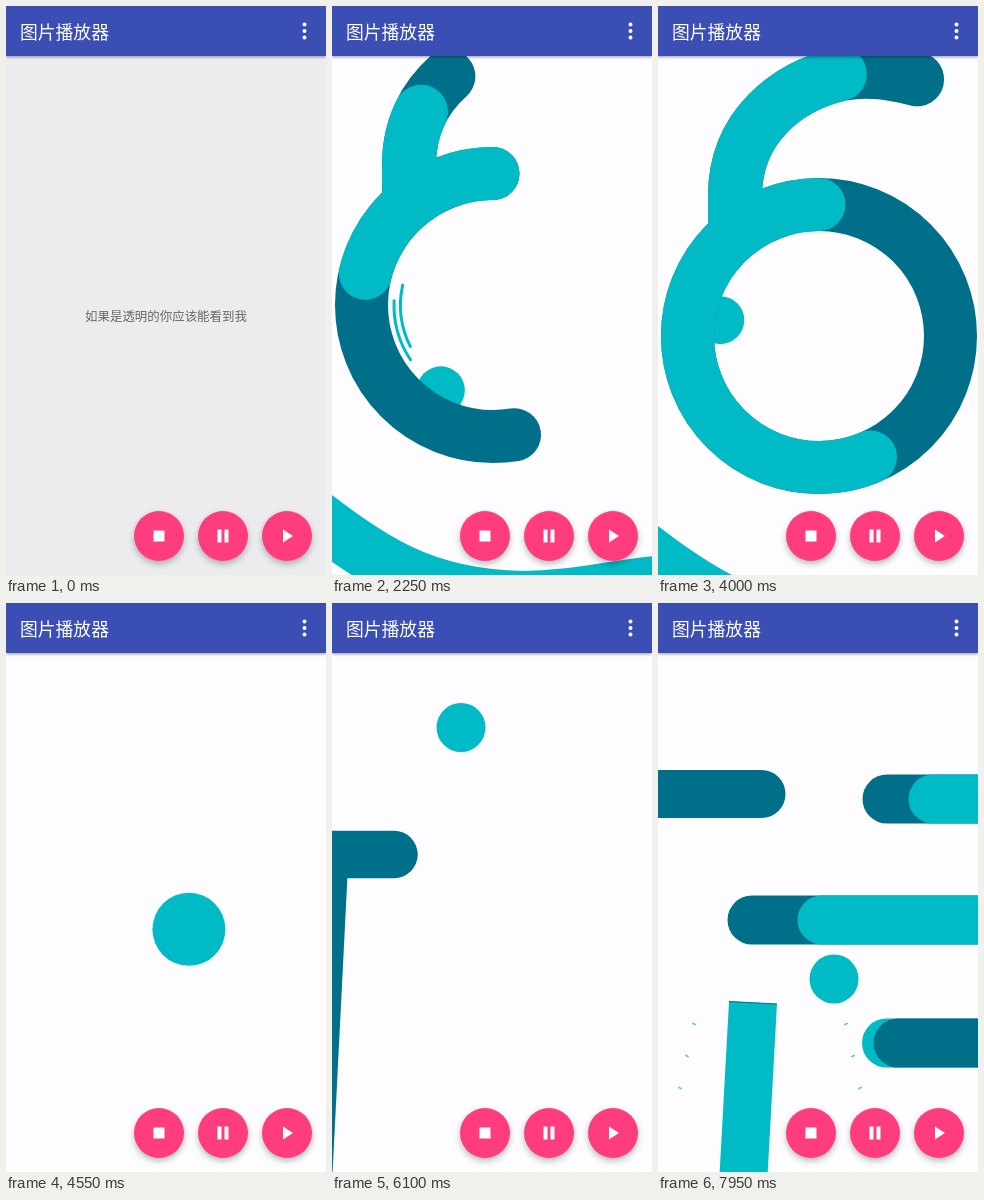
Write an HTML page with a canvas that moves like this. It is 320 by 569 pixels and loops after 8 s.

```html
<!DOCTYPE html>
<html lang="zh">
<head>
<meta charset="utf-8">
<style>
html, body { margin: 0; width: 100%; height: 100%; overflow: hidden; background: #ecebed; }
#stage { position: relative; width: 320px; height: 569px; overflow: hidden; font-family: "Noto Sans CJK SC", "Noto Sans CJK", sans-serif; }
#hint { position: absolute; top: 301px; width: 320px; text-align: center; font-size: 12.46px; line-height: 18px; color: #68676b; }
canvas, svg { position: absolute; left: 0; top: 0; width: 320px; height: 569px; }
#bar { position: absolute; width: 320px; height: 50px; background: #3b4eb4; box-shadow: 0 1px 3px #0006; }
#title { position: absolute; left: 14px; top: 12px; font-size: 17.8px; line-height: 26px; color: #fff; }
.fab { filter: drop-shadow(0 3px 3px #0004); fill: #ff3c7e; }
</style>
</head>
<body>
<div id="stage">
  <div id="hint">如果是透明的你应该能看到我</div>
  <canvas></canvas>
  <div id="bar"><div id="title">图片播放器</div></div>
  <svg viewBox="0 0 320 569" fill="#fff">
    <path d="M298.5 18.5v0m0 6.5v0m0 6.5v0" stroke="#fff" stroke-width="4" stroke-linecap="round"/>
    <g class="fab"><circle cx="153" cy="530" r="25"/><circle cx="217" cy="530" r="25"/><circle cx="281" cy="530" r="25"/></g>
    <path d="M147.5 524.5h11v11h-11zM211.5 523.5h4v13h-4zM218.5 523.5h4v13h-4zM277 523.5l10 6.5l-10 6.5z"/>
  </svg>
</div>
<script>
const TEAL = '#00bac5', DARK = '#006f8a', PAPER = '#fdfcff', LOOP = 8000;
const canvas = document.querySelector('canvas');
const g = canvas.getContext('2d');
const ratio = window.devicePixelRatio || 1;
canvas.width = 320 * ratio;
canvas.height = 569 * ratio;

const easeIn = u => u * u;
const easeOut = u => 1 - (1 - u) ** 2;
const mix = (a, b, u) => a + (b - a) * u;
const ramp = (t, from, to) => Math.min(1, Math.max(0, (t - from) / (to - from)));
const rad = degrees => degrees * Math.PI / 180;

// Height of a ball that keeps hopping between floor and top.
function bounce(t, start, period, floor, top) {
  const p = (t - start) / period;
  const phase = p - Math.floor(p);
  return mix(floor, top, 4 * phase * (1 - phase));
}

function pathLength(d) {
  const path = document.createElementNS('http://www.w3.org/2000/svg', 'path');
  path.setAttribute('d', d);
  return path.getTotalLength();
}

function disc(x, y, r) {
  g.fillStyle = TEAL;
  g.beginPath();
  g.arc(x, y, r, 0, 2 * Math.PI);
  g.fill();
}

function stroke(path, color, width, length = 1e4, cap = 'round') {
  if (length <= 0) return;
  g.strokeStyle = color;
  g.lineWidth = width;
  g.lineCap = cap;
  g.setLineDash([length, 1e4]);
  g.stroke(path);
}

function line(x1, y1, x2, y2, color, width, cap) {
  stroke(new Path2D(`M${x1} ${y1}L${x2} ${y2}`), color, width, 1e4, cap);
}

function arc(r, from, to, color, width) {
  const path = new Path2D();
  path.arc(0, 0, r, rad(from), rad(to), true);
  stroke(path, color, width);
}

function shifted(x, y, draw) {
  g.save();
  g.translate(x, y);
  draw();
  g.restore();
}

const HOOK_TOP = 'M268 0C262 80 256 130 243 197';
const HOOK = HOOK_TOP + 'C223 300 184 415 109 415Q93 415 81 410';
const hook = new Path2D(HOOK);
const topLength = pathLength(HOOK_TOP), hookLength = pathLength(HOOK);
const sprout = new Path2D('M-84 -115V-140C-84 -210 -31 -250 22 -262C54 -268 79 -261 101 -256');
const wave = new Path2D('M-201 193C-121 256 -71 291 29 293C89 293 129 278 199 275');
const arm = new Path2D('M-60 425C-5 450 50 468 99 478');

function hookScene(t) {
  const leave = easeIn(ramp(t, 1700, 1950));
  shifted(-350 * leave, 90 * leave, () => {
    stroke(hook, DARK, 51, hookLength * easeOut(ramp(t, 750, 1250)));
    stroke(hook, TEAL, 51, topLength * (t - 850) / 400);
    disc(144.5 + (t - 1250) * 0.03, bounce(t, 850, 800, 480, 329.5), 24);
  });
}

function ringScene(t) {
  const u = (t - 2250) / 1750;
  const x = mix(500, 161, easeOut(ramp(t, 1700, 1950)));
  const y = mix(299, 330, u) + 620 * easeIn(ramp(t, 4030, 4250));
  const ballAngle = mix(121.6, -170.7, u);
  shifted(x, y, () => {
    stroke(wave, TEAL, 54);
    disc(100 * Math.cos(rad(ballAngle)), 100 * Math.sin(rad(ballAngle)), 24);
    if (t < 2800) {
      arc(99, ballAngle + 61, ballAngle + 25, TEAL, 3);
      arc(92.5, ballAngle + 71, ballAngle + 32, TEAL, 3);
    }
    stroke(sprout, DARK, 54, mix(125, 277, u));
    arc(131.5, -90, -90 - Math.min(360, (t - 1800) * 0.42), DARK, 53);
    stroke(sprout, TEAL, 54, mix(80, 199, u));
    arc(131.5, -90, -90 - mix(76, 203, u), TEAL, 53);
  });
}

function armScene(t) {
  const enter = 1 - easeOut(ramp(t, 5000, 5250));
  const leave = easeIn(ramp(t, 5250, 5650));
  shifted(-210 * leave, 120 * leave, () => {
    disc(127 - (t - 5250) * 0.08, bounce(t, 4290, 880, 509.6, 290), 36.5);
    shifted(-190 * enter, -50 * enter, () => {
      stroke(arm, DARK, 84);
      disc(-5, 446, 45);
    });
  });
}

function crossScene(t) {
  const x = -110 * (1 - easeOut(ramp(t, 5750, 6100))) - 120 * easeIn(ramp(t, 6150, 6650));
  shifted(x, 0, () => {
    line(-8, 262, -25, 600, DARK, 48, 'butt');
    line(-120, 251.5, 62, 251.5, DARK, 47.5);
    if (t > 6180) line(-120, 251.5, mix(-120, 62, ramp(t, 6180, 6500)), 251.5, TEAL, 47.5);
  });
}

function barsScene(t) {
  const enter = 1 - easeOut(ramp(t, 7400, 7950));
  const caps = [{ dark: 229, teal: 275 }, { dark: 94, teal: 164 }, { dark: 240, teal: 228.5 }];
  caps.forEach(({ dark, teal }, row) => {
    const y = 196 + 122 * row - row % 2;
    const bars = [[dark, DARK], [teal, TEAL]].sort((a, b) => a[0] - b[0]);
    for (const [x, color] of bars) line(x + 300 * enter, y, 700, y, color, 49);
  });

  const late = 1 - easeOut(ramp(t, 7700, 7950));
  line(-200, 191, 103.5 - 140 * late, 191, DARK, 48);
  shifted(0, 190 * late, () => {
    line(95, 399.5, 84, 600, TEAL, 48, 'butt');
    line(71, 398.5, 119, 401, DARK, 1.2, 'butt');
  });
  if (t < 7800) return;
  for (const side of [-1, 1]) {
    for (let i = 0; i < 3; i++) {
      const x = 112 + side * (76 + 7 * i) * (1 - late / 2), y = 421 + 32 * i;
      line(x - 1, y + side / 2, x + 1, y - side / 2, '#5accd0', 1.8);
    }
  }
}

function travellingBall(t) {
  const rise = easeOut(ramp(t, 5250, 6100));
  const x = mix(231, 129, rise) + 47 * ramp(t, 6100, 7950);
  const y = t < 6900
    ? mix(603, 124.5, rise) + 315.5 * easeIn(ramp(t, 6100, 6900))
    : bounce(t, 6900, 700, 440, 376);
  disc(x, y, mix(46, 24.5, rise));
}

function draw(t) {
  g.setTransform(ratio, 0, 0, ratio, 0, 0);
  g.clearRect(0, 0, 320, 569);
  if (t < 50) return;
  g.fillStyle = PAPER;
  g.fillRect(0, 0, 320, 569);
  if (t < 1950) hookScene(t);
  if (t >= 1700 && t < 4250) ringScene(t);
  if (t >= 4290 && t < 5650) armScene(t);
  if (t >= 5750 && t < 6700) crossScene(t);
  if (t >= 7400) barsScene(t);
  if (t >= 5200) travellingBall(t);
}

const start = performance.now();
function frame() {
  draw((performance.now() - start) % LOOP);
  requestAnimationFrame(frame);
}
frame();
</script>
</body>
</html>
```
